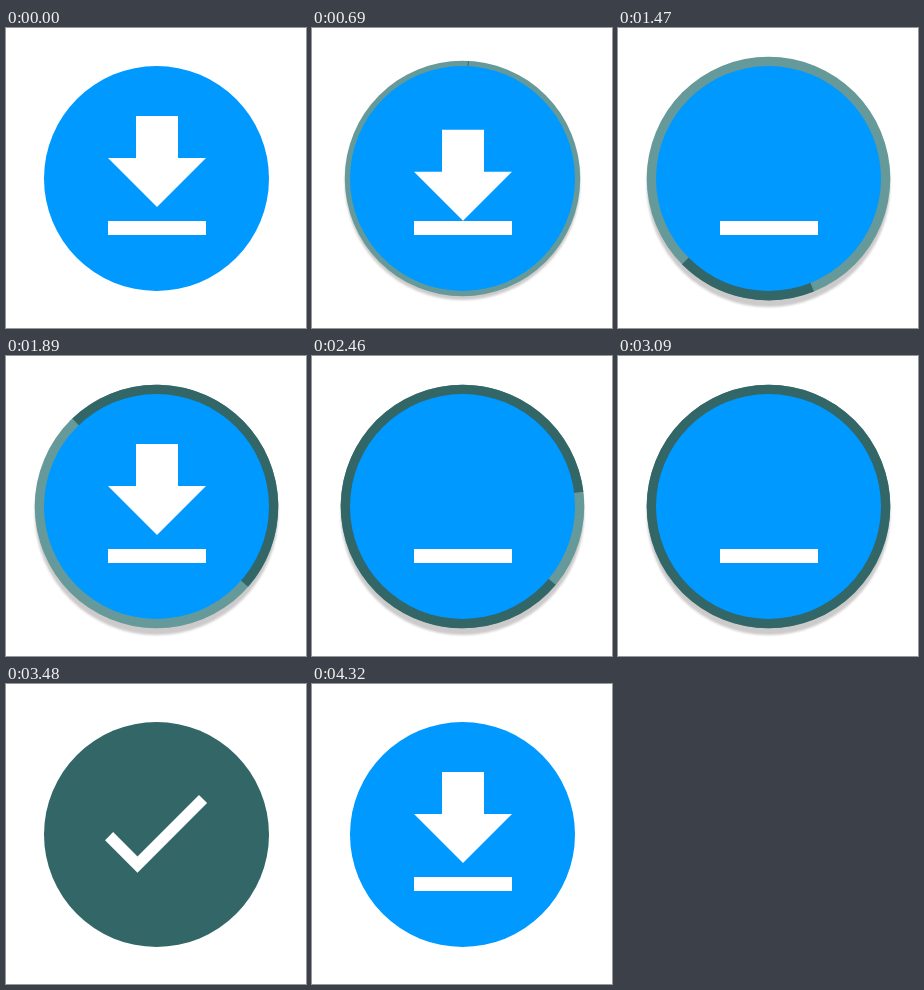
Write an HTML page with a canvas that moves like this. It is 300 by 300 pixels and loops after 4.88 s.

```html
<!DOCTYPE html>
<html lang="en">
<head>
<meta charset="utf-8">
<title>Download button</title>
<style>
  html, body { margin: 0; width: 100%; height: 100%; overflow: hidden; background: #fff; }
  canvas { display: block; width: 300px; height: 300px; }
</style>
</head>
<body>
<canvas id="stage" width="300" height="300"></canvas>
<script>
const ctx = document.getElementById('stage').getContext('2d');
const LOOP = 4880, STEP = 30;
const C = 150.5, R = 112.5, RING = 9.3;
const BLUE = [0, 153, 255], TEAL = [51, 102, 102];
const LIGHT = '#669999', DARK = '#336666';
const START = 570, DONE = 3110, RESET = 4200;
const ARROW_CYCLE = 1320, FALL = 168;

const clamp = x => Math.min(1, Math.max(0, x));
const span = (t, from, length) => clamp((t - from) / length);

// CSS-style cubic bezier, solved by bisection
function bezier(x1, y1, x2, y2) {
  const at = (a, b, u) => 3 * a * u * (1 - u) ** 2 + 3 * b * u * u * (1 - u) + u ** 3;
  return x => {
    if (x <= 0 || x >= 1) return clamp(x);
    let lo = 0, hi = 1;
    for (let i = 0; i < 24; i++) {
      const mid = (lo + hi) / 2;
      if (at(x1, x2, mid) < x) lo = mid; else hi = mid;
    }
    return at(y1, y2, lo);
  };
}
const ease = bezier(.25, .1, .25, 1);
const easeInOut = bezier(.42, 0, .58, 1);

function powInOut(x, p) {
  return x < .5 ? (2 * x) ** p / 2 : 1 - (2 - 2 * x) ** p / 2;
}

function mix(a, b, k) {
  return `rgb(${a.map((v, i) => Math.round(v + (b[i] - v) * k)).join()})`;
}

function disc(y, r, color) {
  ctx.fillStyle = color;
  ctx.beginPath();
  ctx.arc(C, y, r, 0, 2 * Math.PI);
  ctx.fill();
}

function poly(points) {
  ctx.beginPath();
  points.forEach(([x, y]) => ctx.lineTo(x, y));
  ctx.fill();
}

function drawRing(t, grow) {
  const width = RING * grow;
  const outer = R + width;

  ctx.save();
  ctx.filter = 'blur(0.8px)';
  disc(C + 6.8 * grow, outer, '#cccaca');
  ctx.restore();

  disc(C, outer, LIGHT);

  let part = powInOut(span(t, START, 2670), 2.5);
  if (part > .995) part = 1;
  const from = (-90 + 540 * easeInOut(span(t, START, 2400))) * Math.PI / 180;
  ctx.strokeStyle = DARK;
  ctx.lineWidth = width + 1;
  ctx.beginPath();
  ctx.arc(C, C, outer - ctx.lineWidth / 2, from, from + part * 2 * Math.PI);
  ctx.stroke();
}

function drawDownload(drop, alpha) {
  ctx.save();
  ctx.globalAlpha = alpha;
  ctx.fillStyle = '#fff';
  ctx.fillRect(102, 193, 98, 14);
  ctx.beginPath();
  ctx.rect(0, 0, 300, 193);
  ctx.clip();
  ctx.translate(0, drop);
  poly([[130, 88], [172, 88], [172, 130], [200, 130], [151, 179], [102, 130], [130, 130]]);
  ctx.restore();
}

function drawCheck(alpha) {
  ctx.save();
  ctx.globalAlpha = alpha;
  ctx.fillStyle = '#fff';
  ctx.translate(79.3, 78.5);
  ctx.scale(5.8, 5.8);
  poly([[9, 16.2], [4.8, 12], [3.4, 13.4], [9, 19], [21, 7], [19.6, 5.6]]);
  ctx.restore();
}

function draw(t) {
  const leave = ease(span(t, DONE, 380));
  const grow = ease(span(t, START - 10, 400)) * (1 - leave);
  const done = leave * (1 - span(t, RESET, 120));

  let drop = 0;
  if (t >= START && t < RESET) {
    const runs = (t - START) / ARROW_CYCLE;
    drop = runs < 2 ? FALL * ease(runs % 1) : FALL;
  }

  ctx.fillStyle = '#fff';
  ctx.fillRect(0, 0, 300, 300);
  if (grow > .02) drawRing(t, grow);
  disc(C, R, mix(BLUE, TEAL, done));
  if (done < 1) drawDownload(drop, 1 - done);
  if (done > 0) drawCheck(done);
}

const begin = performance.now();
function frame() {
  const t = (performance.now() - begin) % LOOP;
  draw(Math.floor(t / STEP) * STEP);
  requestAnimationFrame(frame);
}
frame();
</script>
</body>
</html>
```
